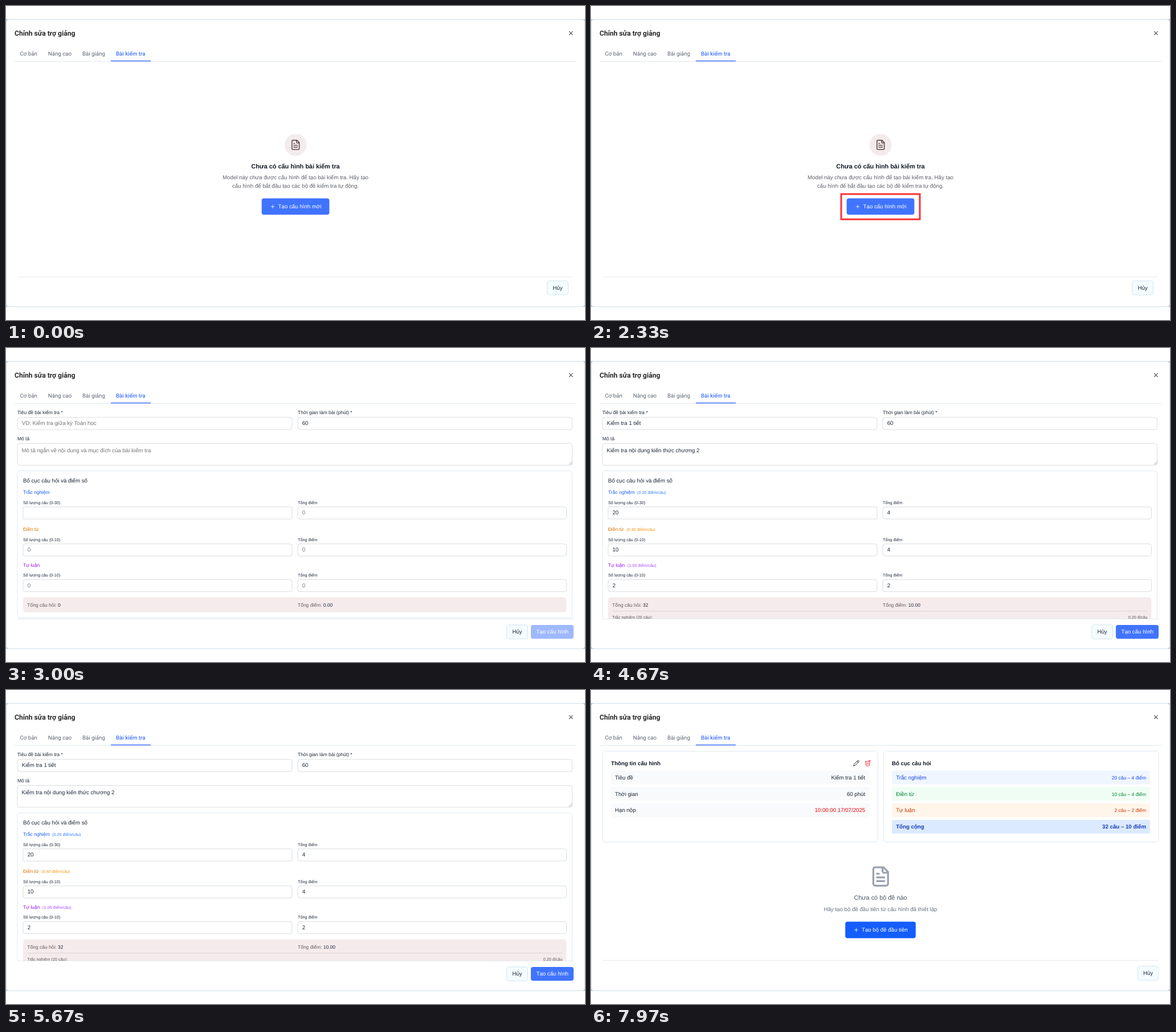
These frames come from a looping animation (1016 by 551 pixels, 8000 ms). An HTML page:

```html
<!DOCTYPE html>
<html lang="vi">
<head>
<meta charset="utf-8">
<title>Chỉnh sửa trợ giảng</title>
<style>
  html, body { margin: 0; width: 100%; height: 100%; overflow: hidden; background: #fff; }
  svg { display: block; }
  text { font-family: "Liberation Sans", Arial, sans-serif; text-rendering: geometricPrecision; white-space: pre; }
  .ui { font-family: Roboto, sans-serif; }
</style>
</head>
<body>
<svg id="stage" width="1016" height="551" viewBox="0 0 1016 551"></svg>
<script>
const XS = 7.26, SM = 8.47, MD = 9.68, LG = 10.88, XL = 12.1;
const INK = '#1e2939', GREY = '#6a7282', HINT = '#757575', BLUE = '#4074ff', EDGE = '#cfd3d9', CARD = '#d3e2ec';

// y is the middle of the text line
const text = (x, y, str, size = MD, fill = INK, attrs = '') =>
  `<text x="${x}" y="${(y + size * .3465).toFixed(2)}" font-size="${size}" fill="${fill}" ${attrs}>${str}</text>`;
const END = 'text-anchor="end"', MID = 'text-anchor="middle"', BOLD = 'font-weight="700"';
const box = (x1, y1, x2, y2, fill, stroke = 'none', r = 4, w = .8) =>
  `<rect x="${x1}" y="${y1}" width="${x2 - x1}" height="${y2 - y1}" rx="${r}" fill="${fill}" stroke="${stroke}" stroke-width="${w}"/>`;
const path = (d, stroke, w = .8, attrs = '') =>
  `<path d="${d}" fill="none" stroke="${stroke}" stroke-width="${w}" stroke-linecap="round" stroke-linejoin="round" ${attrs}/>`;
const rule = (x1, x2, y, color = '#dde4ea') => `<path d="M${x1} ${y}H${x2}" stroke="${color}" stroke-width=".8"/>`;
// 24-unit icon centred on a point
const icon = (cx, cy, size, d, color, w = 2) =>
  path(d, color, w, `transform="translate(${cx - size / 2} ${cy - size / 2}) scale(${size / 24})"`);

const FILE = 'M15 2H6a2 2 0 0 0-2 2v16a2 2 0 0 0 2 2h12a2 2 0 0 0 2-2V7ZM14 2v4a2 2 0 0 0 2 2h4M10 9H8M16 13H8M16 17H8';
const PLUS = 'M5 12h14M12 5v14';
const PENCIL = 'M21.2 6.8a1 1 0 0 0-4-4L3.8 16.2a2 2 0 0 0-.5.8L2 21.4a.5.5 0 0 0 .6.6L7 20.7a2 2 0 0 0 .8-.5ZM15 5l4 4';
const TRASH = 'M2 6h16M4 6l1 14a2 2 0 0 0 2 2h9a2 2 0 0 0 2-2l1-14M9 11v6M14 11v6M15 6l1-4h5v3';

const button = (x1, y1, x2, y2, label, fill, tx) =>
  box(x1, y1, x2, y2, fill) + text(tx, (y1 + y2) / 2, label, MD, '#fff');
const cancel = (x, y) =>
  box(x, y, x + 37, y + 24.7, '#f4fcff', '#c8e2ee') + text(x + 18.6, y + 12.2, 'Hủy', MD, INK, MID);
const input = (x1, x2, y, value, color = INK, r = 4) =>
  box(x1, y, x2, y + 21.3, '#fff', EDGE, r) + text(x1 + 7.7, y + 10.3, value, MD, color);
const textarea = (y, value, color) =>
  box(20, y, 993.5, y + 38.3, '#fff', EDGE) + text(27.5, y + 12, value, MD, color) +
  path(`M988 ${y + 37}l5-5M991 ${y + 37}l2-2`, '#777', .6);

function frame() {
  const tab = (x, label) => text(x, 84, label, MD, '#5d6470', 'class="ui"');
  return box(0, 23, 1016, 528, '#bcc5cc', 'none', 0) +
    box(.4, 23.4, 1015.6, 527.8, '#fff', '#c9dfea', 5) +
    text(15, 47.7, 'Chỉnh sửa trợ giảng', XL, '#262626', 'class="ui" font-weight="600"') +
    path('M988.4 44.7l5.8 5.8M994.2 44.7l-5.8 5.8', '#555', 1.1) +
    rule(15, 1001, 97.2, '#d6dfe6') +
    tab(24.5, 'Cơ bản') + tab(73.8, 'Nâng cao') + tab(134, 'Bài giảng') +
    text(193, 83.5, 'Bài kiểm tra', MD, BLUE, 'class="ui" font-weight="500"') +
    box(184, 95.7, 254, 97.2, BLUE, 'none', 0);
}

function empty() {
  return `<circle cx="508.2" cy="243.7" r="19.3" fill="#f4ebec"/>` +
    icon(508.2, 243.7, 19.35, FILE, '#5f4b50') +
    text(508, 281, 'Chưa có cấu hình bài kiểm tra', LG, '#101828', BOLD + MID) +
    text(508, 301, 'Model này chưa được cấu hình để tạo bài kiểm tra. Hãy tạo', MD, '#5d6066', MID) +
    text(508, 315.5, 'cấu hình để bắt đầu tạo các bộ đề kiểm tra tự động.', MD, '#5d6066', MID) +
    button(448.6, 337.4, 567.4, 366.3, 'Tạo cấu hình mới', BLUE, 477.6) +
    icon(468, 352, MD, PLUS, '#fff') +
    rule(20, 995, 475.5) + cancel(949.5, 482.2);
}

const marker = () => box(439, 330, 577, 374.3, 'none', '#fb3237', 0, 3);

const groups = [
  { name: 'Trắc nghiệm', y: 253.5, field: 278.8, max: 30, n: 20, pts: 4, rate: '0.20', color: '#155dfc', soft: '#2b7fff', rx: 81 },
  { name: 'Điền từ', y: 318.3, field: 343.7, max: 10, n: 10, pts: 4, rate: '0.40', color: '#e17100', soft: '#f5960a', rx: 62.3 },
  { name: 'Tự luận', y: 381, field: 406.3, max: 10, n: 2, pts: 2, rate: '1.00', color: '#9810fa', soft: '#ad46ff', rx: 64 }
];

function form(filled, scroll = 0) {
  const value = (x1, x2, y, v, blank = '0', r = 4) =>
    input(x1, x2, y, filled ? v : blank, filled ? INK : HINT, r);
  const total = (x, label, v) =>
    text(x, 451, `${label}: <tspan fill="${INK}">${v}</tspan>`, SM, '#62595d');

  let s = text(20, 113.3, 'Tiêu đề bài kiểm tra *', SM) +
    value(20, 502, 121.8, 'Kiểm tra 1 tiết', 'VD: Kiểm tra giữa kỳ Toán học') +
    text(512, 113.3, 'Thời gian làm bài (phút) *', SM) + input(512, 993.5, 121.8, '60') +
    text(20, 159, 'Mô tả', SM) +
    textarea(167.5, filled ? 'Kiểm tra nội dung kiến thức chương 2' : 'Mô tả ngắn về nội dung và mục đích của bài kiểm tra', filled ? INK : HINT) +
    box(20, 215.5, 993.5, filled ? 518 : 473.6, '#fff', CARD, 5) +
    text(30, 232.5, 'Bố cục câu hỏi và điểm số');

  groups.forEach((g, i) => {
    s += text(30, g.y, g.name, SM, g.color) +
      (filled ? text(g.rx, g.y + .4, `(${g.rate} điểm/câu)`, XS, g.soft) : '') +
      text(30, g.field - 7.6, `Số lượng câu (0-${g.max})`, XS) +
      text(512, g.field - 7.6, 'Tổng điểm', XS) +
      value(30, 502, g.field, g.n, i ? '0' : '', i ? 4 : 1.2) +
      value(512, 983.5, g.field, g.pts);
  });

  s += box(30, 437.4, 983.5, filled ? 508 : 463.8, '#f5ebed', 'none', 5) +
    total(37.3, 'Tổng câu hỏi', filled ? 32 : 0) + total(512, 'Tổng điểm', filled ? '10.00' : '0.00');
  if (filled) {
    s += rule(37.3, 976.5, 461.7, '#d9ccd1');
    groups.forEach((g, i) => {
      const y = 472 + i * 12.1;
      s += text(37.3, y, `${g.name} (${g.n} câu):`, XS, '#5f575b') +
        text(976.5, y, `${g.rate} đ/câu`, XS, '#5f575b', END);
    });
    s += options();
  }
  return `<g clip-path="url(#view)"><g transform="translate(0 ${-scroll})">${s}</g></g>` +
    rule(20, 996, 475.5) + cancel(878.5, 485.8) +
    button(921, 486, 996, 510.2, 'Tạo cấu hình', filled ? BLUE : '#9fb9ff', 930.5);
}

function options() {
  const wide = 'letter-spacing=".25"';
  return `<g transform="translate(0 179)">` +
    text(20, 355, 'Tạo bởi', SM) + box(20, 363.7, 502, 386, '#fff', EDGE, 3) +
    text(27.5, 375, 'Luveni', SM) +
    path('M481.5 369.5v11', '#d5d5d5') + path('M488.2 373.6l3.1 3.1 3.1-3.1', '#8c8c8c', 1) +
    text(512, 355, 'Hạn nộp bài', SM) + text(559.5, 355.4, '(tùy chọn)', XS, GREY) +
    text(512, 375, 'Ngày', SM) + box(541, 363.7, 649, 386, '#fff', EDGE) +
    text(549.7, 374.7, '10/07/2025', MD, INK, wide) +
    path('M619 372.2h7.4v6.6h-7.4zM619 373h7.4M620.6 371v1M624.8 371v1', '#111', 1.1) +
    text(659, 375, 'Giờ', SM) + box(682.5, 363.7, 769, 386, '#fff', EDGE) +
    text(691.2, 374.7, '10:00 SA', MD, INK, wide) +
    `<circle cx="746.5" cy="375" r="4" fill="none" stroke="#111"/>` + path('M746.4 372.6v2.6l1.8 1.2', '#111') +
    box(20, 397, 29.6, 406.7, '#0a73ee', 'none', 1.6) + path('M22.1 402l2 2 3.6-4.4', '#fff', 1.3) +
    text(34, 402, 'Nâng cao: Sử dụng prompt tùy chỉnh', SM, '#364153') +
    text(20, 419, 'Prompt tùy chỉnh (tùy chọn)', SM) +
    textarea(427.5, 'VD: Tạo câu hỏi tập trung vào đại số và hình học', HINT) + '</g>';
}

function summary() {
  const info = [['Tiêu đề', 'Kiểm tra 1 tiết'], ['Thời gian', '60 phút'], ['Hạn nộp', '10:00:00 17/07/2025']];
  const tones = [['#eff6ff', '#1447e6'], ['#f0fdf4', '#008236'], ['#fff5eb', '#ca3500']];
  const rowY = i => 141.3 + i * 28.9;
  const row = (x1, x2, i, fill) => box(x1, rowY(i), x2, rowY(i) + 24.1, fill, 'none', 2.4);

  let s = box(20, 107.6, 503.4, 267, '#fff', CARD, 5) + box(513.4, 107.6, 996, 267, '#fff', CARD, 5) +
    text(35.3, 129, 'Thông tin cấu hình', MD, '#101828', BOLD) +
    text(528, 129, 'Bố cục câu hỏi', MD, '#101828', BOLD) +
    icon(465.4, 128.5, 11.5, PENCIL, '#222') + icon(485.8, 128.3, 11.5, TRASH, '#f0323a');
  info.forEach(([label, v], i) => {
    const y = rowY(i) + 12;
    s += row(35, 489, i, '#f9fafb') + text(42, y, label) +
      text(481.2, y, v, MD, i === 2 ? '#e7000b' : INK, END);
  });
  groups.forEach((g, i) => {
    const [fill, ink] = tones[i], y = rowY(i) + 12;
    s += row(528, 981, i, fill) + text(535.2, y, g.name, MD, ink) +
      text(974, y + .4, `${g.n} câu – ${g.pts} điểm`, SM, ink, END);
  });
  return s + row(528, 981, 3, '#dbeafe') +
    text(535.2, 240, 'Tổng cộng', MD, '#193cb8', BOLD) +
    text(974, 240, '32 câu – 10 điểm', MD, '#193cb8', BOLD + END) +
    icon(508.3, 327.2, 38.7, FILE, '#99a1af') +
    text(508, 364.5, 'Chưa có bộ đề nào', LG, '#4a5565', MID) +
    text(508, 384.6, 'Hãy tạo bộ đề đầu tiên từ cấu hình đã thiết lập', MD, GREY, MID) +
    button(446.2, 406.6, 569.8, 435.6, 'Tạo bộ đề đầu tiên', '#155dfc', 475) +
    icon(465.5, 421.1, MD, PLUS, '#fff') +
    rule(20, 996, 474.4) + cancel(959, 484.6);
}

const LOOP = 8000;
const scenes = [
  [0, empty()],
  [1330, empty() + marker()],
  [3000, form(false)],
  [4670, form(true)],
  [6340, form(true, 179)],
  [7970, summary()]
];

const stage = document.getElementById('stage');
stage.innerHTML = '<clipPath id="view"><rect x="15" y="107" width="986" height="368.2"/></clipPath>' +
  frame() + scenes.map(([, art]) => `<g class="scene" display="none">${art}</g>`).join('');
const layers = stage.querySelectorAll('.scene');

let shown = -1;
const start = performance.now();
function tick() {
  const t = (performance.now() - start) % LOOP;
  const now = scenes.findLastIndex(([from]) => t >= from);
  if (now !== shown) {
    layers.forEach((el, i) => el.setAttribute('display', i === now ? 'inline' : 'none'));
    shown = now;
  }
  requestAnimationFrame(tick);
}
tick();
</script>
</body>
</html>
```
